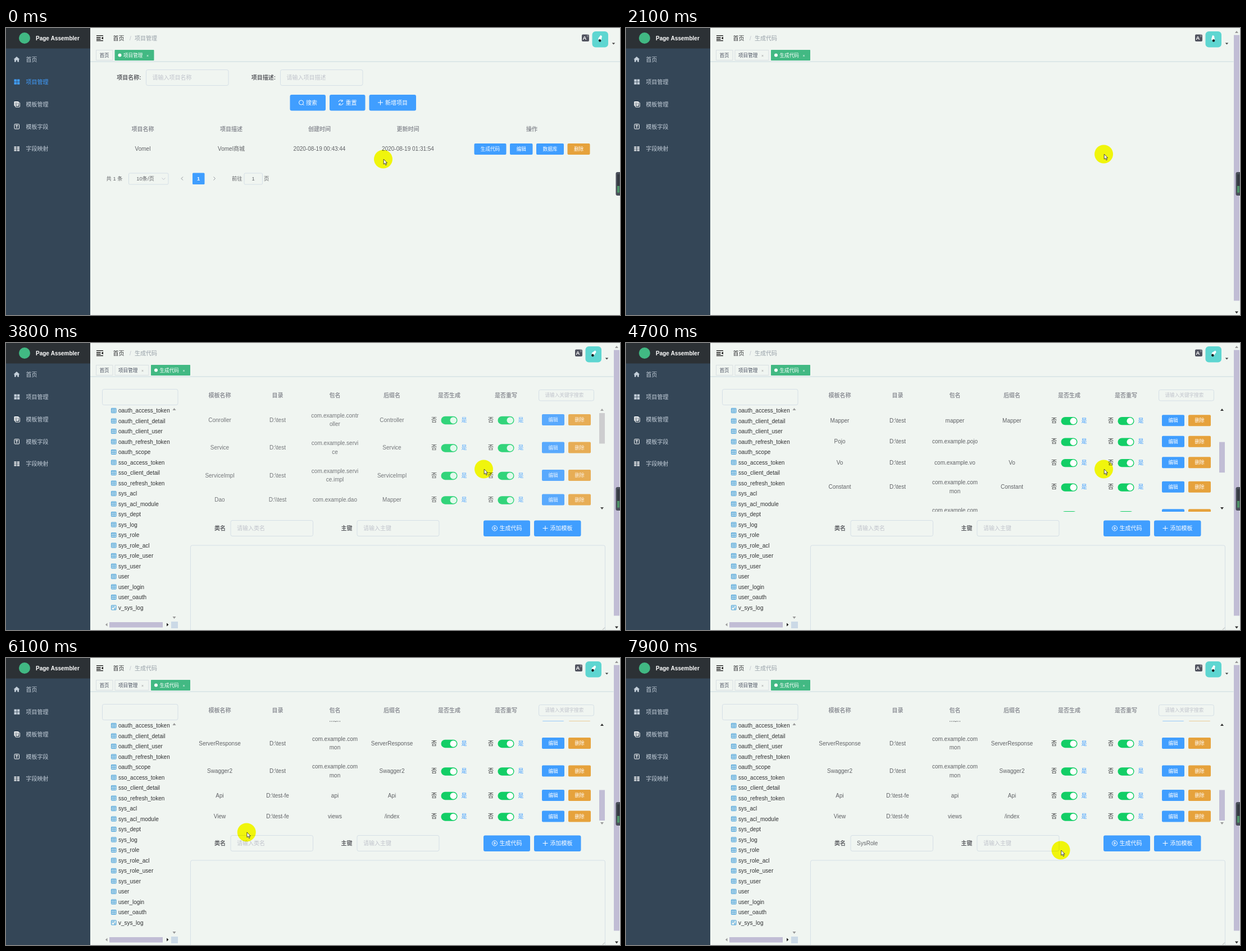
An HTML page with a canvas that plays this animation: 1093 by 512 pixels, repeating every 8000 ms.

```html
<!DOCTYPE html>
<html lang="zh-CN">
<head>
<meta charset="utf-8">
<style>
html, body { margin: 0; width: 100%; height: 100%; overflow: hidden; background: #f0f5f1; }
canvas { display: block; }
</style>
</head>
<body>
<canvas id="stage" width="1093" height="512"></canvas>
<script>
const g = document.getElementById('stage').getContext('2d');
const LOOP = 8000, BG = '#f0f5f1', BLUE = '#409eff', ORANGE = '#e6a23c', GREEN = '#42b983';
const INK = '#303133', BODY = '#606266', MUTED = '#909399', PALE = '#c0c4cc', BORDER = '#d5dfe6', THUMB = '#c1bdd5';
const FONT = '"Liberation Sans", "Noto Sans CJK SC", "Noto Sans CJK", sans-serif';

const clamp = v => Math.max(0, Math.min(1, v));
const span = (t, a, b) => clamp((t - a) / (b - a));
const ease = p => p < .5 ? 2 * p * p : 1 - 2 * (1 - p) ** 2;

// y is the visual middle of the text
function text(s, x, y, color = BODY, size = 10, align = 'left', bold = false) {
  g.font = `${bold ? 'bold ' : ''}${size}px ${FONT}`;
  g.textAlign = align;
  g.fillStyle = color;
  g.fillText(s, x, y + size * .36);
}
const center = (s, x, y, color, size, bold) => text(s, x, y, color, size, 'center', bold);

function box(x, y, w, h, fill, r = 0, stroke) {
  g.beginPath();
  g.roundRect(x, y, w, h, r);
  if (fill) { g.fillStyle = fill; g.fill(); }
  if (stroke) { g.strokeStyle = stroke; g.lineWidth = 1; g.stroke(); }
}
function disc(x, y, r, fill) {
  g.beginPath();
  g.arc(x, y, r, 0, 7);
  g.fillStyle = fill;
  g.fill();
}
function path(d, x, y, fill, stroke, width = 1) {
  const p = new Path2D(d);
  g.save();
  g.translate(x, y);
  if (fill) { g.fillStyle = fill; g.fill(p); }
  if (stroke) { g.strokeStyle = stroke; g.lineWidth = width; g.stroke(p); }
  g.restore();
}
function input(x, y, w, h, hint, value, size = 10) {
  box(x + .5, y + .5, w - 1, h - 1, null, 3, BORDER);
  text(value || hint, x + 11.5, y + h / 2, value ? BODY : PALE, size);
}
function smallButton(label, x, y, w, color = BLUE) {
  box(x, y - 10, w, 20, color, 2);
  center(label, x + w / 2, y, '#fff', 8.6);
}
function button(label, icon, x, y, w) {
  box(x, y, w, 28.5, BLUE, 3);
  path(icon, x + 20, y + 14, null, '#fff');
  text(label, x + 28.5, y + 14, '#fff');
}
const arrowUp = (x, y, c) => path('M-3 2L0 -2L3 2Z', x, y, c);
const arrowDown = (x, y, c) => path('M-3 -2L0 2L3 -2Z', x, y, c);

const ICON = {
  search: 'M4 0A4 4 0 1 1 -4 0A4 4 0 1 1 4 0M3 3L5 5',
  refresh: 'M-4 -1A4 4 0 0 1 3 -3M3 -5V-2H0M4 1A4 4 0 0 1 -3 3M-3 5V2H0',
  plus: 'M-4.5 0H4.5M0 -4.5V4.5',
  play: 'M4.5 0A4.5 4.5 0 1 1 -4.5 0A4.5 4.5 0 1 1 4.5 0M-1 -2L2 0L-1 2Z'
};

function sidebar(active) {
  box(0, 0, 150, 512, '#344657');
  box(0, 0, 150, 36.5, '#2c3135');
  disc(33, 18, 10, '#41b883');
  text('Page Assembler', 53, 18, '#fff', 10, 'left', true);
  const menu = ['首页', '项目管理', '模板管理', '模板字段', '字段映射'];
  menu.forEach((s, i) => text(s, 35.5, 56.5 + i * 39.8, i === active ? BLUE : '#c3ced9'));
  path('M-5.5 0L0 -5L5.5 0H4V4.5H1.2V1.5H-1.2V4.5H-4V0Z', 19, 56, '#c3ced9');
  const tile = active === 1 ? BLUE : '#c3ced9';
  for (const [x, y] of [[14.5, 91.5], [19.8, 91.5], [14.5, 96.5], [19.8, 96.5]]) box(x, y, 4.5, 4.2, tile);
  box(16.5, 133, 8, 8, null, 1, '#fff');
  box(14.5, 131, 8, 8, '#fff', 1);
  path('M16 133.5H21M16 135.5H21M16 137.5H20', 0, 0, null, '#344657', .8);
  box(15, 171.5, 8.5, 8.5, null, 1, '#fff');
  path('M17 173.8H21.5M19.2 174V178.5', 0, 0, null, '#fff', 1.2);
  for (let y = 211.5; y < 219; y += 3) { box(14.5, y, 4, 2, '#fff'); box(19.7, y, 4.3, 2, '#fff'); }
}

function tab(label, x, w, active, closable = true) {
  box(x + .5, 39.5, w - 1, 18, active ? GREEN : null, 0, active ? GREEN : '#d8dfe2');
  if (active) disc(x + 9, 48.5, 3, '#fff');
  text(label, x + (active ? 15.5 : 6.5), 48.5, active ? '#fff' : '#495060', 8.6);
  if (closable) center('×', x + w - 11.5, 49, active ? '#fff' : '#999', 7);
}

function header(t, opened, shift) {
  path('M161 13.7H173M161 17H168.5M161 20H168.5M161 22.7H173', 0, 0, null, '#111', 1.3);
  path('M173 15.5V20.5L169.7 18Z', 0, 0, '#111');
  text('首页', 190.5, 18, INK);
  text('/', 220, 18, PALE);
  text(opened ? '生成代码' : '项目管理', 229, 18, '#97a0a8');
  tab('首页', 160, 30.5, false, false);
  if (opened) {
    tab('项目管理', 193.5, 61, false);
    tab('生成代码', 258, 70, true);
  } else tab('项目管理', 193.5, 70, true);
  box(150, 59.5, shift ? 932 : 943, 1, '#c9d9e0');

  g.save();
  g.translate(-shift, 0);
  box(1025, 11.5, 13, 12.5, '#50535f', 2);
  center('A', 1030, 18, '#fff', 9.5, true);
  center('文', 1035.5, 15, '#d5d7dc', 4);
  box(1043.5, 6, 28.5, 28.5, '#5ed6d1', 6);
  g.translate(1058, 20);
  g.rotate(.35 + .45 * Math.sin(t / 180));
  path('M-2 -7L1 -6L2 1L-1 4L-4 0Z', 0, 0, '#fff');
  disc(0, 2.5, 2.3, '#151b1d');
  g.restore();
  path('M-2.8 -1.4H2.8L0 1.6Z', 1081.5 - shift, 28, '#444');
}

function projects() {
  text('项目名称:', 240.5, 88.5, BODY, 10, 'right', true);
  input(249, 74, 147.5, 29, '请输入项目名称');
  text('项目描述:', 480, 88.5, BODY, 10, 'right', true);
  input(488, 74, 147.5, 29, '请输入项目描述');
  button('搜索', ICON.search, 505.5, 119, 63.5);
  button('重置', ICON.refresh, 576, 119, 63.5);
  button('新增项目', ICON.plus, 646.5, 119, 83.5);
  const columns = [243.5, 401, 558, 715.5, 936];
  ['项目名称', '项目描述', '创建时间', '更新时间', '操作'].forEach((s, i) => center(s, columns[i], 180.5, MUTED, 10, true));
  ['Vomel', 'Vomel商城', '2020-08-19 00:43:44', '2020-08-19 01:31:54'].forEach((s, i) => center(s, columns[i], 215.5));
  smallButton('生成代码', 833.5, 216, 57);
  smallButton('编辑', 897, 216, 40.5);
  smallButton('数据库', 944, 216, 49);
  smallButton('删除', 999.5, 216, 40, ORANGE);

  text('共 1 条', 178.5, 268.5, BODY, 9.3);
  box(218.5, 259, 70.5, 20, null, 2, BORDER);
  center('10条/页', 248, 268.5, BODY, 9.3);
  path('M-3 -1.5L0 1.5L3 -1.5', 280.5, 269, null, PALE);
  path('M1.5 -3L-1.5 0L1.5 3', 313.5, 268.5, null, MUTED);
  box(332, 258.5, 21.5, 20.5, BLUE, 1.5);
  center('1', 342.5, 268.5, '#fff', 9.3, true);
  path('M-1.5 -3L1.5 0L-1.5 3', 371, 268.5, null, MUTED);
  text('前往', 402, 268.5, BODY, 9.3);
  box(424, 259, 32.5, 20, null, 2, BORDER);
  center('1', 440, 268.5, BODY, 9.3);
  text('页', 459, 268.5, BODY, 9.3);
}

const TABLES = ('oauth_access_token oauth_client_detail oauth_client_user oauth_refresh_token oauth_scope ' +
  'sso_access_token sso_client_detail sso_refresh_token sys_acl sys_acl_module sys_dept sys_log sys_role ' +
  'sys_role_acl sys_role_user sys_user user user_login user_oauth v_sys_log').split(' ');

function tree() {
  TABLES.forEach((name, i) => {
    const y = 120.5 + i * 18.5;
    box(187.5, y - 4, 8.5, 8, null, .5, '#3d9bd8');
    path(i < 19 ? 'M-4 -2H4M-4 1H4M-1.3 -3V4M1.5 -3V4' : 'M-3 -2H2M-3 0H0M2 0V4', 191.7, y, null, '#3d9bd8', i < 19 ? .9 : 1.2);
    text(name, 200, y, INK);
  });
  arrowUp(299.5, 118, '#999');
  arrowDown(299.5, 490, '#999');
  path('M1.5 -3L-2 0L1.5 3Z', 179, 502.5, '#999');
  box(184, 498, 95, 9.5, THUMB);
  path('M-1.5 -3L2 0L-1.5 3Z', 287.5, 502.5, '#222');
  box(294, 497, 12, 12, '#cbd9e6');
}

// name, directory, package (| breaks the line), suffix
const ROWS = [
  ['Conroller', 'D:\\test', 'com.example.contr|oller', 'Controller'],
  ['Service', 'D:\\test', 'com.example.servi|ce', 'Service'],
  ['ServiceImpl', 'D:\\test', 'com.example.servi|ce.impl', 'ServiceImpl'],
  ['Dao', 'D:\\\\test', 'com.example.dao', 'Mapper'],
  ['Mapper', 'D:\\test', 'mapper', 'Mapper'],
  ['Pojo', 'D:\\test', 'com.example.pojo', ''],
  ['Vo', 'D:\\test', 'com.example.vo', 'Vo'],
  ['Constant', 'D:\\test', 'com.example.com|mon', 'Constant'],
  ['ResponseCode', 'D:\\test', 'com.example.com|mon', 'ResponseCode'],
  ['ServerResponse', 'D:\\test', 'com.example.com|mon', 'ServerResponse'],
  ['Swagger2', 'D:\\test', 'com.example.com|mon', 'Swagger2'],
  ['Api', 'D:\\test-fe', 'api', 'Api'],
  ['View', 'D:\\test-fe', 'views', '/index']
];
const COLUMNS = [380.5, 483.5, 585.5, 687, 789, 890];

function toggle(x, y) {
  center('否', x - 27, y, INK);
  box(x - 14.5, y - 6.2, 29, 14.4, '#13ce66', 7.2);
  disc(x + 7.3, y + 1, 5.8, '#fff');
  center('是', x + 26.5, y, BLUE);
}

function templateRows(scroll) {
  g.save();
  g.beginPath();
  g.rect(328, 112, 740, 189);
  g.clip();
  let top = 112.2 - scroll;
  for (const [name, dir, pack, suffix] of ROWS) {
    const lines = pack.split('|');
    const h = lines.length > 1 ? 49.5 : 37.5, y = top + h / 2;
    [name, dir, , suffix].forEach((s, i) => center(s, COLUMNS[i], y));
    lines.forEach((s, i) => center(s, COLUMNS[2], y + (i - (lines.length - 1) / 2) * 15.8));
    toggle(789, y);
    toggle(890, y);
    smallButton('编辑', 954, y, 40);
    smallButton('删除', 1001, y, 40, ORANGE);
    top += h;
  }
  g.restore();
  const p = scroll / 382.5;
  arrowUp(1061, 119, p > 0 ? '#333' : '#999');
  box(1056, 125 + 110.5 * p, 10, 54.5, p > 0 ? THUMB : '#c8c8ca');
  arrowDown(1061, 295, p < 1 ? '#333' : '#999');
}

function generator(t) {
  const alpha = g.globalAlpha;
  input(171, 82, 135.5, 29, '');
  ['模板名称', '目录', '包名', '后缀名', '是否生成', '是否重写'].forEach((s, i) => center(s, COLUMNS[i], 93.5, MUTED, 10, true));
  input(948, 83, 99, 20.5, '请输入关键字搜索', '', 8.6);
  text('类名', 371, 330.5, BODY, 10, 'left', true);
  input(399.5, 316, 147.5, 29, '请输入类名', t >= 7000 && 'SysRole');
  text('主键', 596.5, 330.5, BODY, 10, 'left', true);
  input(624.5, 316, 147, 29, '请输入主键');
  button('生成代码', ICON.play, 850, 316.5, 83);
  button('添加模板', ICON.plus, 940, 316.5, 83.5);
  box(328.5, 361, 738, 160, null, 3, BORDER);
  path('M1062 511.5L1066 507.5', 0, 0, null, '#999', .8);
  if (t >= 2800) tree();
  g.globalAlpha = alpha * span(t, 3500, 3850);
  templateRows(382.5 * ease(span(t, 4000, 5450)));
}

function pageScrollbar() {
  box(1081.5, 0, 11.5, 512, BG);
  arrowUp(1087, 7, '#999');
  box(1082, 12.5, 10, 474, THUMB);
  arrowDown(1087, 507.5, '#333');
}

function meter() {
  box(1085.5, 257, 12, 42, '#4b505b', 3);
  box(1088, 261, 4, 33, '#343941');
  for (let y = 282; y < 294; y += 2) box(1088, y, 4, 1.4, '#58b878');
}

// time, x, y
const TRACK = [
  [150, 671.5, 234], [1000, 847.5, 226], [1500, 847.5, 226], [1800, 850.5, 225],
  [5500, 850.5, 225], [6500, 231, 351], [7100, 231, 351], [7800, 774, 343]
];
function pointerAt(t) {
  const i = TRACK.findIndex(k => k[0] > t);
  if (i <= 0) return TRACK[i ? TRACK.length - 1 : 0].slice(1);
  const [a, b] = [TRACK[i - 1], TRACK[i]], p = ease(span(t, a[0], b[0]));
  return [a[1] + (b[1] - a[1]) * p, a[2] + (b[2] - a[2]) * p];
}

function pointer(t, opened) {
  const [x, y] = pointerAt(t);
  g.globalCompositeOperation = 'multiply';
  disc(x, y, 16.5, '#ffff0c');
  g.globalCompositeOperation = 'source-over';
  if (opened ? x < 306 : x > 833)
    path('M0 0Q1.5 -1 2 .5V4.5L7 5.5Q8 6 7.5 8.5L6 12.5H0L-3 8Q-3 6 -.5 7.5V.5Z', x + .5, y, '#fff', '#222', .9);
  else
    path('M0 0V9L2.2 7.2L3.7 10.7L5.2 10L3.7 6.7H6.5Z', x + .7, y, '#fff', '#222', .8);
}

function page(draw, alpha, dx, t) {
  if (alpha <= 0) return;
  g.save();
  g.globalAlpha = alpha;
  g.translate(dx, 0);
  draw(t);
  g.restore();
}

function render(t) {
  const opened = t >= 1550, mounted = t >= 2050;
  const leave = ease(span(t, 1550, 2050)), enter = ease(span(t, 2100, 2600));
  box(0, 0, 1093, 512, BG);
  if (mounted) page(generator, enter, -30 * (1 - enter), t);
  else page(projects, 1 - leave, 30 * leave, t);
  sidebar(opened ? -1 : 1);
  header(t, opened, mounted ? 12 : 0);
  if (mounted) pageScrollbar();
  meter();
  pointer(t, opened);
}

const start = performance.now();
function frame() {
  render((performance.now() - start) % LOOP);
  requestAnimationFrame(frame);
}
frame();
</script>
</body>
</html>
```
